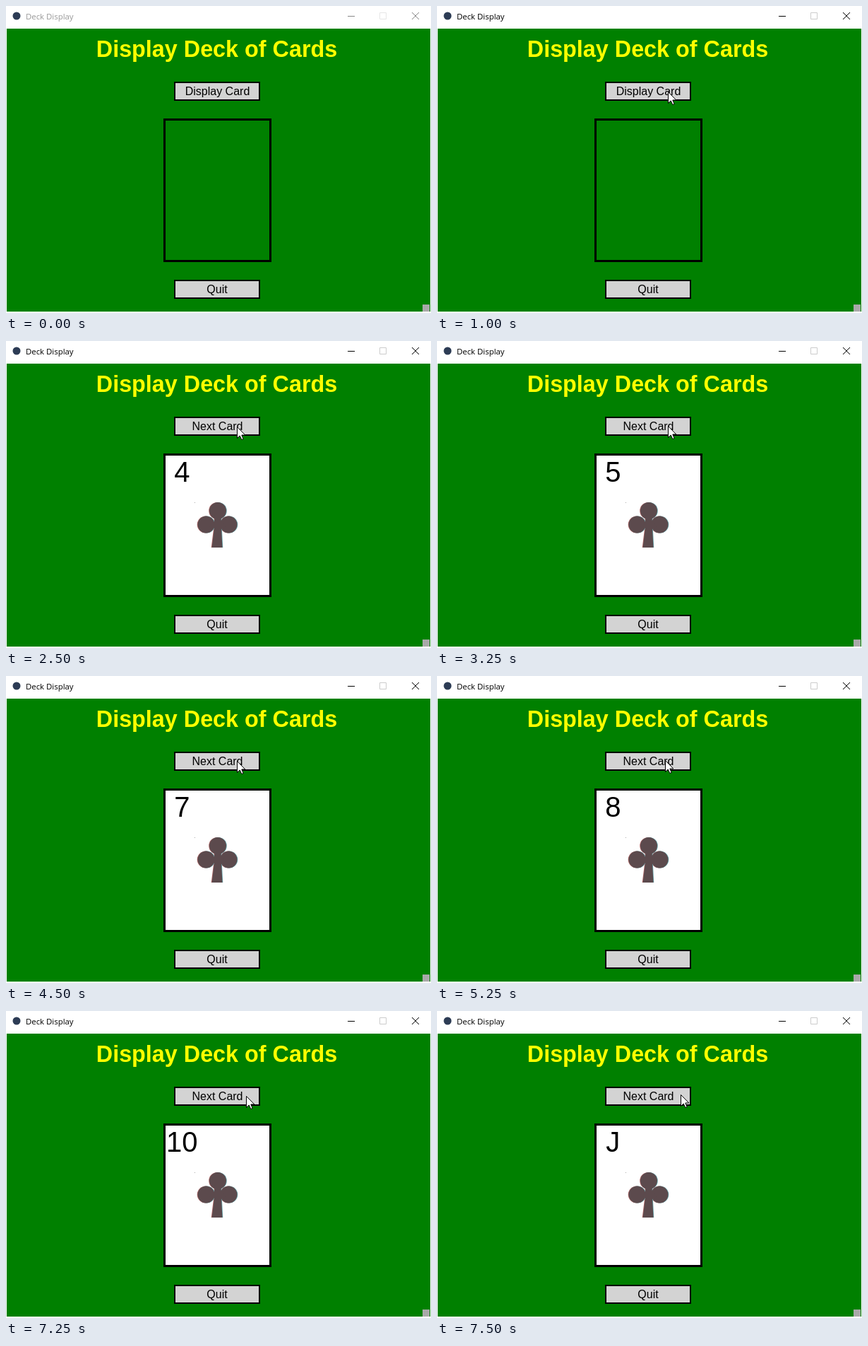
An HTML page for the animation above (8000 ms loop, 602 by 434 pixels).

```html
<!DOCTYPE html>
<html lang="en">
<head>
<meta charset="utf-8">
<title>Deck Display</title>
<style>
  html, body { margin: 0; width: 100%; height: 100%; overflow: hidden; background: #fff; }
  svg { display: block; }
  text { font: 16px "Liberation Sans", Arial, sans-serif; text-anchor: middle; }
  #caption { font: 11.4px "Open Sans", sans-serif; text-anchor: start; }
  #heading { font-size: 32.35px; font-weight: bold; fill: #ff0; }
  #rank { font-size: 40px; }
  .button { fill: #d3d3d3; stroke: #000; stroke-width: 2; }
</style>
</head>
<body>
<svg width="602" height="434" viewBox="0 0 602 434">
  <defs>
    <g id="club">
      <circle cx="300" cy="240" r="12"/>
      <circle cx="283.5" cy="259.5" r="12"/>
      <circle cx="315.5" cy="259.5" r="12"/>
      <path d="M296 246h8l1 9 6 8q-5 5-6 1l1.500 28h-15l3.500-28q-2 4-7-1l7-8z"/>
    </g>
  </defs>

  <circle cx="15" cy="14" r="5.500" fill="#2d3c55"/>
  <text id="caption" x="28" y="19">Deck Display</text>
  <g fill="none" id="controls">
    <path d="M484 14.500h10M575 9l10 10M585 9l-10 10"/>
    <path id="maximize" d="M529.500 9.500h9v9h-9z"/>
  </g>

  <rect x="1" y="32" width="600" height="400" fill="#008000"/>
  <rect x="590" y="422" width="10" height="10" fill="#a9a9a9"/>
  <text id="heading" x="298.500" y="72">Display Deck of Cards</text>

  <rect class="button" x="239" y="108" width="120" height="25"/>
  <text id="label" x="299.500" y="126"></text>
  <rect class="button" x="239" y="388" width="120" height="25"/>
  <text x="299" y="406">Quit</text>

  <rect id="card" x="224.500" y="160.500" width="150" height="200" stroke="#000" stroke-width="3"/>
  <g id="face">
    <text id="rank" x="249.300" y="199"></text>
    <use href="#club" x="-0.800" fill="#b06a6a"/>
    <use href="#club" x="0.800" fill="#6aaab0"/>
    <use href="#club" fill="#5c4a4d"/>
    <rect x="267" y="228" width="1" height="1" fill="#aaa"/>
  </g>

  <path id="cursor" d="M.5 .5V16.500L4.200 13L6.800 18.500L9.200 17.500L6.800 12H11.800Z"
        fill="#fff" stroke="#000"/>
</svg>
<script>
const LOOP = 8000, ACTIVE = 1000;
const ranks = [[1250, "2"], [2000, "3"], [2500, "4"], [3250, "5"], [4000, "6"],
  [4500, "7"], [5250, "8"], [5750, "9"], [6500, "10"], [7500, "J"]];
// time, x, y of the pointer tip
const moves = [[250, 315, 280], [500, 334, 151], [750, 327, 121], [3000, 327, 120],
  [5250, 323, 119], [6750, 322, 120], [7000, 337, 120], [7250, 340, 120], [7500, 345, 118]];

const el = id => document.getElementById(id);
const set = (id, name, value) => el(id).setAttribute(name, value);
const latest = (list, t) => list.filter(item => item[0] <= t).pop();
const show = (id, on) => set(id, "visibility", on ? "visible" : "hidden");

function draw(t) {
  const active = t >= ACTIVE;
  set("caption", "fill", active ? "#000" : "#999");
  set("controls", "stroke", active ? "#000" : "#888");
  set("maximize", "stroke", active ? "#ccc" : "#e6e6e6");

  const rank = latest(ranks, t);
  el("label").textContent = rank ? "Next Card" : "Display Card";
  el("rank").textContent = rank ? rank[1] : "";
  set("card", "fill", rank ? "#fff" : "none");
  show("face", rank);

  const tip = latest(moves, t);
  show("cursor", tip);
  if (tip) set("cursor", "transform", `translate(${tip[1]} ${tip[2]})`);
}

const start = performance.now();
function tick() {
  draw((performance.now() - start) % LOOP);
  requestAnimationFrame(tick);
}
tick();
</script>
</body>
</html>
```
